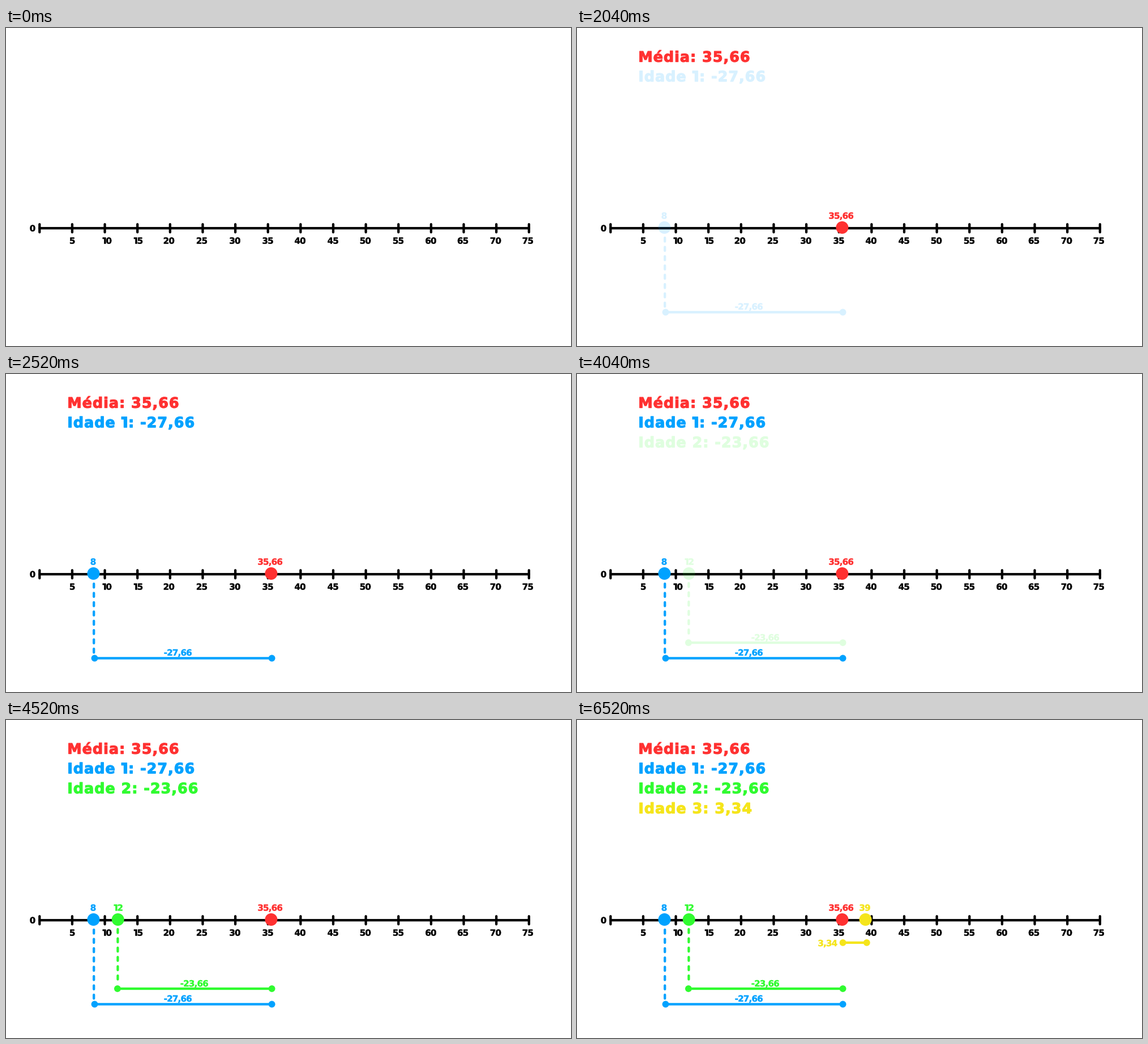
A matplotlib script that plays this animation: 998x561 px, repeating every 8000 ms.

```python
import matplotlib.pyplot as plt
import numpy as np
from matplotlib.animation import FuncAnimation
from matplotlib.colors import to_rgb
from matplotlib.patches import Circle, PathPatch
from matplotlib.path import Path
from matplotlib.textpath import TextPath

W, H, DPI = 998, 561, 64
STEP, LOOP = 40, 8000
FADE = 500
PX = 72 / DPI  # points per pixel
CAP = 0.729  # cap height in em
FONT = {"family": "DejaVu Sans", "weight": "bold"}

RED, BLUE, GREEN, YELLOW = "#ff3131", "#00a2ff", "#30fb30", "#f5e51b"
AXIS_Y = 353.2
DOT_Y = 352
MEAN_X = 469.6

fig = plt.figure(figsize=(W / DPI, H / DPI), dpi=DPI, facecolor="white")
ax = fig.add_axes([0, 0, 1, 1])
ax.set_xlim(0, W)
ax.set_ylim(H, 0)
ax.axis("off")


def right_edge(text):
    return TextPath((0, 0), text, size=100, prop=FONT).get_extents().x1


def glyph(ch, size):
    """Outline and advance of one character; the 1 has no foot."""
    if ch == "1":
        pts = [(.02, CAP), (.39, CAP), (.39, 0), (.19, 0), (.19, .57), (.02, .57)]
        return Path(np.array(pts + pts[:1]) * size, closed=True), .45 * size
    advance = (right_edge("I" + ch + "I") - right_edge("II")) / 100 * size
    return TextPath((0, 0), ch, size=size, prop=FONT), advance


def text(s, x, cy, color, size=15, tracking=-0.75, bold=0.5, align="center"):
    """Tracked text with its capitals centred on cy."""
    pen, verts, codes = 0, [], []
    for ch in s:
        path, advance = glyph(ch, size)
        if ch != " ":
            verts.append(path.vertices + [pen, 0])
            codes.append(path.codes)
        pen += advance + tracking
    path = Path(np.concatenate(verts), np.concatenate(codes))
    box = path.get_extents()
    left = x - box.x0 if align == "left" else x - (box.x0 + box.x1) / 2
    path = Path(path.vertices * [1, -1] + [left, cy + CAP * size / 2], path.codes)
    patch = PathPatch(path, facecolor=color, edgecolor=color, snap=False,
                      lw=bold * PX, joinstyle="round", zorder=4)
    return ax.add_patch(patch)


def title(s, cy, color):
    return text(s, 110.7, cy, color, size=25.4, tracking=1.03, bold=1.2, align="left")


def line(x0, y0, x1, y1, color, width=4.3):
    return ax.plot([x0, x1], [y0, y1], color=color, lw=width * PX, snap=False,
                   solid_capstyle="round", zorder=2)[0]


def dot(x, y, r, color):
    return ax.add_patch(Circle((x, y), r, facecolor=color, lw=0, zorder=3))


def dashes(x, top, count, color):
    return [line(x, top + 2 + 16.4 * i, x, top + 8.5 + 16.4 * i, color)
            for i in range(count)]


def bar(x, y, color):
    return [line(x, y, MEAN_X, y, color),
            dot(x, y, 5.9, color), dot(MEAN_X, y, 5.9, color)]


# Number line
line(59.3, AXIS_Y, 923.8, AXIS_Y, "black")
for i in range(16):
    x = 59.3 + 57.63 * i
    line(x, 346.2, x, 360.3, "black")
text("0", 47, AXIS_Y, "black")
centers = [117.2, 178.5, 233.5, 288, 346, 404.5, 462.5, 519.5,
           577.5, 635, 693, 750.5, 807, 865, 921.8]
for i, x in enumerate(centers, 1):
    text(str(5 * i), x, 375.1, "black")

# Each group: start time, colour, big dot, remaining parts
groups = [
    (550, RED, dot(468.4, DOT_Y, 11, RED),
     [title("Média: 35,66", 50.3, RED), text("35,66", 466.7, 331, RED)]),
    (2000, BLUE, dot(154.5, DOT_Y, 11, BLUE),
     [title("Idade 1: -27,66", 84.9, BLUE), text("8", 154, 331, BLUE),
      text("-27,66", 303.7, 491.3, BLUE),
      *dashes(155.2, 368, 8, BLUE), *bar(156.5, 501.4, BLUE)]),
    (4000, GREEN, dot(197.7, DOT_Y, 11, GREEN),
     [title("Idade 2: -23,66", 120, GREEN), text("12", 198.2, 331, GREEN),
      text("-23,66", 332.7, 464.6, GREEN),
      *dashes(197.4, 367, 6, GREEN), *bar(196.9, 474, GREEN)]),
    (6000, YELLOW, dot(509.6, DOT_Y, 11, YELLOW),
     [title("Idade 3: 3,34", 155.3, YELLOW), text("39", 508.5, 331, YELLOW),
      text("3,34", 442.9, 393.5, YELLOW), *bar(511.8, 392.8, YELLOW)]),
]


def update(frame):
    t = frame * STEP
    for start, color, marker, parts in groups:
        p = min(max((t - start) / FADE, 0), 1)
        alpha = 1 - (1 - p) ** 2
        # Overlapping parts are tinted towards white so they fade as one
        tint = 1 - alpha * (1 - np.array(to_rgb(color)))
        marker.set_alpha(alpha)
        marker.set_visible(alpha > 0)
        for part in parts:
            part.set_color(tuple(tint))
            part.set_visible(alpha > 0)
    return []


anim = FuncAnimation(fig, update, frames=LOOP // STEP, interval=STEP,
                     init_func=lambda: update(0), repeat=True, repeat_delay=0)
plt.show()
```
